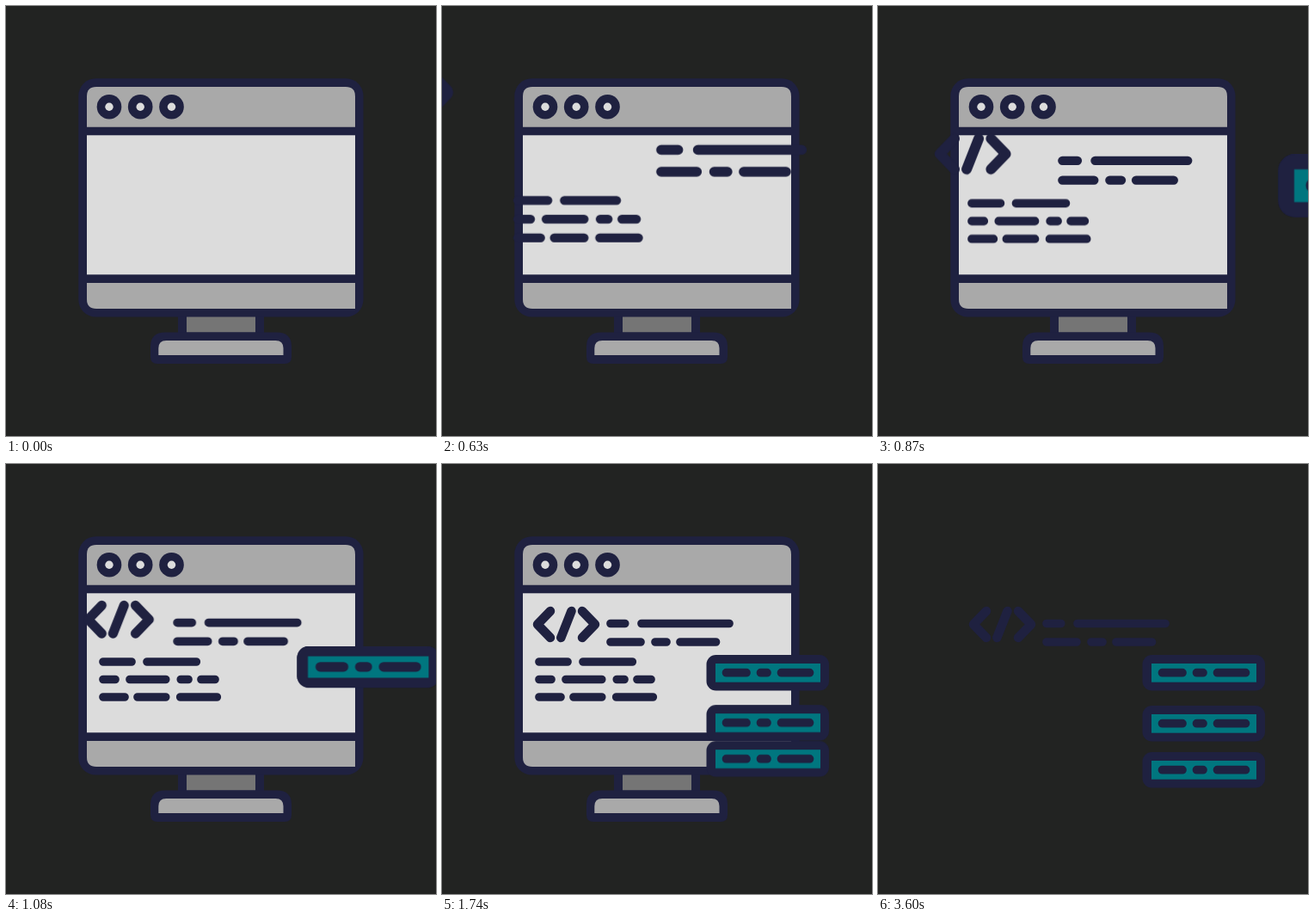
Animation, 500 px wide and 500 px high, one loop 3630 ms. Source, as an HTML page without scripts:

```html
<!DOCTYPE html>
<html lang="en">
<head>
<meta charset="utf-8">
<title>Code window</title>
<style>
  :root {
    --navy: #1f2140;
    --loop: 3630ms;
    --early: cubic-bezier(.333, .711, .667, .911);
    --late: cubic-bezier(.2, .8, .4, 1);
  }
  html, body { margin: 0; width: 100%; height: 100%; overflow: hidden; background: #222322; }
  svg { display: block; width: 100vw; height: 100vh; }
  .navy { fill: var(--navy); }
  .grey { fill: #a9a9a9; }
  .light { fill: #dcdcdc; }
  .dark { fill: #757575; }
  .teal { fill: #00767f; }
  .line {
    fill: none; stroke: var(--navy); stroke-width: 9.7;
    stroke-linecap: round; stroke-linejoin: round;
  }

  /* each part flies in from (--x, --y) at double size, easing out */
  .fly { animation: var(--loop) linear infinite; transform-origin: var(--o); }
  .body  { --x: -341px; --y: -44px;  --o: 179px 250.5px; animation-name: body; }
  .head  { --x: 387px;  --y: -88px;  --o: 265px 196.3px; animation-name: head; }
  .tag   { --x: -236px; --y: -100px; --o: 144.5px 186.5px; animation-name: tag; }
  .stack { --x: 281px;  --y: -45px;  --o: 379px 242.7px; animation-name: stack; }
  .fly {
    --far: translate(var(--x), var(--y)) scale(2);
    --near: translate(calc(var(--x) * .0625), calc(var(--y) * .0625)) scale(1.0625);
    --home: translate(0px, 0px) scale(1);
  }
  @keyframes body {
    0% { transform: var(--far); }
    4.02% { transform: var(--far); animation-timing-function: var(--early); }
    16.94% { transform: var(--near); animation-timing-function: var(--late); }
    29.86%, 100% { transform: var(--home); }
  }
  @keyframes head {
    0% { transform: var(--far); }
    9.92% { transform: var(--far); animation-timing-function: var(--early); }
    22.84% { transform: var(--near); animation-timing-function: var(--late); }
    35.76%, 100% { transform: var(--home); }
  }
  @keyframes tag {
    0% { transform: var(--far); }
    15.7% { transform: var(--far); animation-timing-function: var(--early); }
    28.62% { transform: var(--near); animation-timing-function: var(--late); }
    41.54%, 100% { transform: var(--home); }
  }
  @keyframes stack {
    0% { transform: var(--far); }
    21.6% { transform: var(--far); animation-timing-function: var(--early); }
    34.52% { transform: var(--near); animation-timing-function: var(--late); }
    47.44%, 100% { transform: var(--home); }
  }

  /* lower buttons slide out from behind the one above */
  .second { animation: second var(--loop) cubic-bezier(.165, .84, .44, 1) infinite; }
  .third { animation: third var(--loop) cubic-bezier(.165, .84, .44, 1) infinite; }
  @keyframes second {
    0%, 38.02% { transform: translateY(0px); }
    51.24%, 100% { transform: translateY(59px); }
  }
  @keyframes third {
    0%, 43.8% { transform: translateY(0px); }
    57.02%, 100% { transform: translateY(54px); }
  }

  .blink { animation: blink var(--loop) step-end infinite; }
  @keyframes blink {
    0% { opacity: 1; }
    99.17%, 100% { opacity: 0; }
  }
</style>
</head>
<body>
<svg viewBox="0 0 500 500">
  <defs>
    <g id="dot">
      <circle class="navy" r="14.3"/>
      <circle class="light" r="4.7"/>
    </g>
    <g id="button">
      <rect class="navy" x="307.5" y="222" width="142.5" height="41.5" rx="11"/>
      <rect class="teal" x="318" y="232" width="122" height="21.7"/>
      <path class="line" d="M330.5 242.7H354M370.5 242.7H378M394.5 242.7H427.5"/>
    </g>
  </defs>

  <g class="blink">
    <rect class="navy" x="200" y="355" width="100" height="34"/>
    <rect class="dark" x="210" y="361" width="80" height="18.5"/>
    <path class="navy" d="M168 408V396Q168 379.5 185 379.5H315Q332 379.5 332 396V408Q332 416 324 416H176Q168 416 168 408Z"/>
    <path class="grey" d="M177.3 406V398Q177.3 389 186.3 389H313.5Q322.5 389 322.5 398V406Z"/>
    <rect class="navy" x="84.3" y="84.3" width="331.2" height="277.2" rx="20"/>
    <path class="grey" d="M94 140.7V105Q94 94 105 94H395Q406 94 406 105V140.7Z"/>
    <rect class="light" x="94" y="150.3" width="312" height="162"/>
    <path class="grey" d="M94 322H406V352H105Q94 352 94 341Z"/>
    <use href="#dot" x="120" y="117.2"/>
    <use href="#dot" x="156.2" y="117.2"/>
    <use href="#dot" x="192.5" y="117.2"/>
    <g class="fly body">
      <path class="line" d="M113 230H146M164 230H221.3
        M113 250.5H127M144 250.5H185.7M203.3 250.5H212M227 250.5H243
        M113 271H138M153 271H185.7M202.7 271H245.3"/>
    </g>
  </g>

  <g class="fly head">
    <path class="line" d="M196 185.5H212.7M232 185.5H334M196 207H231M248 207H261M277 207H318.5"/>
  </g>
  <g class="fly tag">
    <path class="line" stroke-width="10.5" style="stroke-width:10.5" d="M126 171L111 186.5L126 202M150.5 171L138.3 202M163 171L178 186.5L163 202"/>
  </g>
  <g class="fly stack">
    <g class="second">
      <g class="third"><use href="#button"/></g>
      <use href="#button"/>
    </g>
    <use href="#button"/>
  </g>
</svg>
</body>
</html>
```
